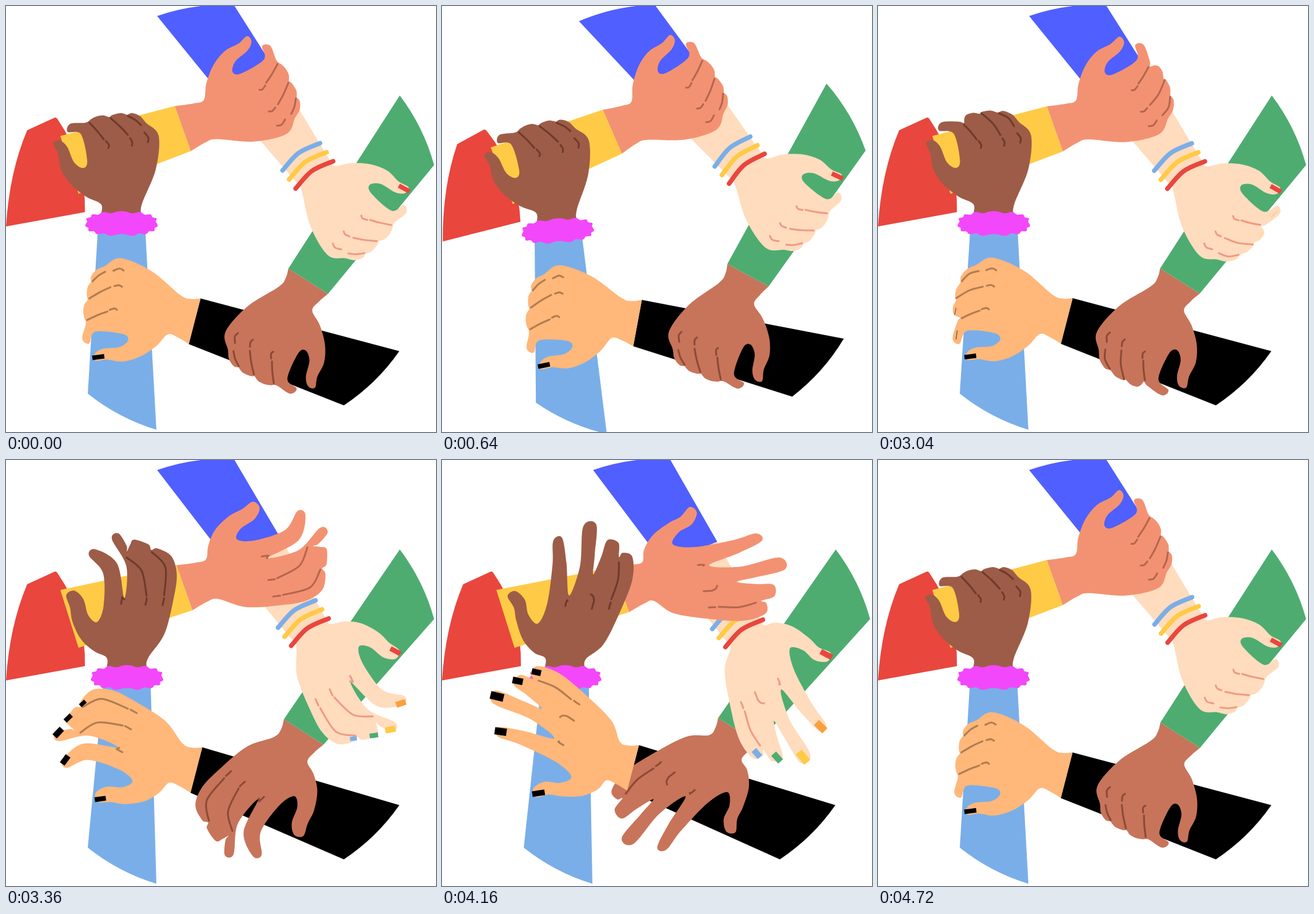
Write an HTML page with a canvas that moves like this. It is 752 by 744 pixels and loops after 4800 ms.

```html
<!DOCTYPE html>
<html lang="en">
<head>
<meta charset="utf-8">
<title>Circle of hands</title>
<style>
html, body { margin: 0; width: 100%; height: 100%; overflow: hidden; background: #fff; }
canvas { display: block; }
</style>
</head>
<body>
<canvas id="stage" width="752" height="744"></canvas>
<script>
const ctx = document.getElementById('stage').getContext('2d');
const LOOP = 4800, STEP = 80, CX = 381, CY = 379;
const RED = '#e9463e', YELLOW = '#ffca45', GREEN = '#4eac71', SKY = '#7aaee8', BLACK = '#000';

const parse = text => text.trim().split(/\s+/).map(Number);
const pose = (outline, creases, nails) =>
  ({ outline: parse(outline), creases: parse(creases), nails: parse(nails) });

// One hand in three poses, reused five times around the circle.
// Outline: thumb to little finger. Creases: three points each. Nails: x1 y1 x2 y2 width.
const grip = pose(
  `166 346 140 333 113 311 96 285 91 258 83 240 94 235 107 246 119 273 135 283 142 270
   131 224 108 220 112 206 138 204 146 200 148 198 158 193 170 191 180 194 182 193 187 190
   200 187 209 189 212 190 220 187 234 192 245 204 267 227 262 285 238 345`,
  `146 204 160 219 171 233 175 236 180 243 179 248 183 196 200 211 213 225
   217 231 221 238 220 244 213 192 226 199 236 208 242 221 249 230 248 238`,
  `86 233 95 252 8 114 212 128 210 0 155 198 166 197 0 194 192 205 193 0 222 193 234 197 0`);

const half = pose(
  `173 345 150 333 126 314 109 285 104 258 99 236 113 229 128 243 138 272 153 282 162 258
   156 207 122 183 131 170 178 184 193 238 191 188 159 154 166 142 186 149 188 149 190 147
   197 145 222 154 228 157 240 156 266 171 279 197 283 232 273 295 246 345`,
  `194 237 194 237 194 237 194 237 194 243 193 249 189 150 222 179 234 232
   235 238 235 244 234 249 229 158 261 180 264 230 265 236 265 243 264 249`,
  `101 231 109 248 8 125 173 146 172 8 161 147 182 148 8 191 147 208 149 6 227 158 241 160 5`);

const wide = pose(
  `181 346 162 337 143 314 132 280 128 258 116 238 129 229 146 244 152 270 169 286 186 250
   197 180 203 138 219 133 221 180 224 235 246 185 258 113 283 111 277 170 274 208 290 172
   301 141 319 145 319 172 325 164 340 170 338 212 313 272 283 325 252 348`,
  `221 246 221 246 221 246 221 246 219 251 218 256 269 247 269 247 269 247
   269 247 267 254 265 261 319 183 312 215 299 244 298 250 296 256 295 261`,
  `119 230 129 250 10 212 130 213 153 13 272 104 271 130 14 310 136 310 156 12 333 165 333 183 11`);

// cut: how far up the arm the sleeve starts
const arms = [
  { skin: '#9d5c47', ink: '#6f3a2c', sleeve: SKY, cut: 0 },
  { skin: '#f39272', ink: '#b5664f', sleeve: YELLOW, cut: 0.04 },
  { skin: '#ffdcbd', ink: '#ef9a86', sleeve: '#505fff', cut: 0.43, nails: [RED, '#fc9f3f', YELLOW, GREEN, SKY] },
  { skin: '#c7745a', ink: '#8c4a36', sleeve: GREEN, cut: 0 },
  { skin: '#ffb77a', ink: '#b07d50', sleeve: BLACK, cut: 0, nails: Array(5).fill(BLACK) }
];

let open = 0;

// Quadratic blend through the three poses.
function blend(key) {
  const a = (1 - open) * (1 - 2 * open), b = 4 * open * (1 - open), c = open * (2 * open - 1);
  return grip[key].map((v, i) => a * v + b * half[key][i] + c * wide[key][i]);
}

const wristShift = () => 14 * open;
const lerp = (a, b, t) => a + (b - a) * t;

// Corners of the forearm at a cut: thumb side, then little finger side.
function forearm(cut) {
  const s = wristShift();
  return [[lerp(161 + s, 143, cut), lerp(386, 677, cut)], [lerp(243 + s, 263, cut), lerp(381, 740, cut)]];
}

// Open Catmull-Rom spline through the points.
function spline(n) {
  const last = n.length / 2 - 1;
  const at = (i, axis) => n[2 * Math.max(0, Math.min(last, i)) + axis];
  const handle = (i, sign, axis) => at(i, axis) + sign * (at(i + 1, axis) - at(i - 1, axis)) / 6;
  ctx.beginPath();
  ctx.moveTo(n[0], n[1]);
  for (let i = 0; i < last; i++) {
    ctx.bezierCurveTo(handle(i, 1, 0), handle(i, 1, 1), handle(i + 1, -1, 0), handle(i + 1, -1, 1),
      at(i + 1, 0), at(i + 1, 1));
  }
}

function fill(color) {
  ctx.fillStyle = color;
  ctx.fill();
}

function stroke(color, width, cap = 'round') {
  ctx.strokeStyle = color;
  ctx.lineWidth = width;
  ctx.lineCap = cap;
  ctx.stroke();
}

function rotateScene(angle) {
  ctx.translate(CX, CY);
  ctx.rotate(angle);
  ctx.translate(-CX, -CY);
}

function onArm(index, paint) {
  ctx.save();
  rotateScene(index * Math.PI * 2 / 5);
  paint(arms[index]);
  ctx.restore();
}

function paintSleeve({ sleeve, cut }) {
  const [left, right] = forearm(cut);
  ctx.beginPath();
  ctx.moveTo(...left);
  if (sleeve === YELLOW) {
    ctx.lineTo(148, 604);
    ctx.lineTo(254, 605);
  } else {
    ctx.lineTo(143, 677);
    ctx.quadraticCurveTo(197, 720, 263, 740);
  }
  ctx.lineTo(...right);
  fill(sleeve);
}

function paintHand({ skin, ink, cut, nails = [] }) {
  const [left, right] = forearm(cut), s = wristShift();
  spline([...left, 166 + s, 365, ...blend('outline'), 237 + s, 365, ...right]);
  fill(skin);

  const nailData = blend('nails');
  nails.forEach((color, i) => {
    const [x1, y1, x2, y2, width] = nailData.slice(i * 5, i * 5 + 5);
    if (width < 0.5) return;
    spline([x1, y1, x2, y2]);
    stroke(color, width, 'butt');
  });

  const creases = blend('creases');
  for (let i = 0; i < creases.length; i += 6) {
    spline(creases.slice(i, i + 6));
    stroke(ink, 3.2);
  }
}

function paintBracelets() {
  const s = wristShift();
  [RED, YELLOW, SKY].forEach((color, i) => {
    const y = 354 + 19.5 * i;
    spline([163 + s, y, 203 + s, y + 8, 244 + s, y]);
    stroke(color, 8);
  });
}

function paintScrunchie() {
  const root = v => Math.sign(v) * Math.abs(v) ** 0.75;
  ctx.beginPath();
  for (let i = 0; i < 120; i++) {
    const a = i * Math.PI / 60, ruffle = 1.7 * Math.sin(15 * a);
    ctx.lineTo(202 + wristShift() + root(Math.cos(a)) * (62 + ruffle),
      380 + root(Math.sin(a)) * (20 + ruffle));
  }
  fill('#f347fb');
}

function paintJacket() {
  ctx.beginPath();
  ctx.moveTo(0, 385);
  ctx.quadraticCurveTo(6, 290, 37, 217);
  ctx.lineTo(85, 195);
  ctx.quadraticCurveTo(88, 194, 91, 199);
  ctx.quadraticCurveTo(140, 270, 138, 360);
  fill(RED);
}

function ease(t, start) {
  const p = Math.max(0, Math.min(1, (t - start) / 640));
  return (1 - Math.cos(Math.PI * p)) / 2;
}

function draw(t) {
  open = ease(t, 2960) - ease(t, 4080);
  ctx.setTransform(1, 0, 0, 1, 0, 0);
  ctx.fillStyle = '#fff';
  ctx.fillRect(0, 0, 752, 744);
  if (t < 960) rotateScene(0.08 * Math.sin(2 * Math.PI * t / 960));

  onArm(4, paintSleeve);
  for (let i = 3; i >= 0; i--) {
    onArm(i, paintHand);
    if (i === 2) onArm(i, paintBracelets);
    if (i === 1) paintJacket();
    onArm(i, paintSleeve);
  }
  onArm(0, paintScrunchie);
  onArm(4, paintHand);
}

const began = performance.now();
function tick() {
  const t = (performance.now() - began) % LOOP;
  draw(Math.floor(t / STEP) * STEP);
  requestAnimationFrame(tick);
}
tick();
</script>
</body>
</html>
```
